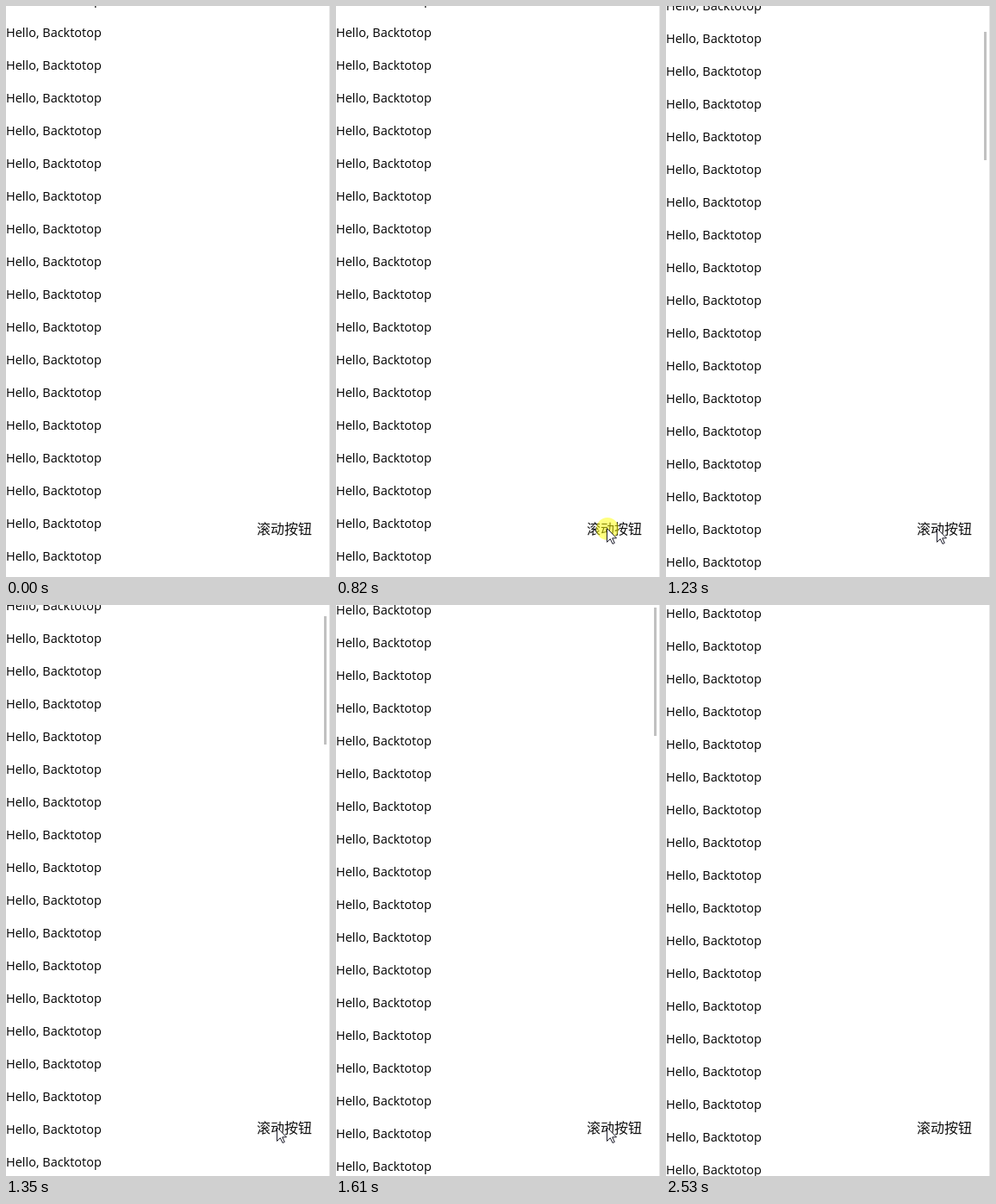
These frames come from a looping animation (376 px wide and 663 px high, 3280 ms). An HTML page:

```html
<!DOCTYPE html>
<html lang="zh">
<head>
<meta charset="utf-8">
<title>Back to top</title>
<style>
  html, body { margin: 0; width: 100%; height: 100%; overflow: hidden; background: #fff; }
  svg { display: block; }
  .row { font: 14.5px "Open Sans", "Noto Sans", sans-serif; }
  .button { font: 350 16px "Noto Sans CJK SC", "Noto Sans CJK", sans-serif; fill: #111; }
</style>
</head>
<body>
<svg width="376" height="663" viewBox="0 0 376 663">
  <g id="list"></g>
  <rect x="375" width="1" height="663" fill="#e4e4e4"/>
  <text class="button" x="291" y="613">滚动按钮</text>
  <rect id="thumb" x="369" width="3" height="149" fill="#c1c1c1"/>
  <circle id="press" cx="315" cy="607" r="13" fill="#ff0" fill-opacity=".5"/>
  <path id="cursor" d="M.5 .5V16.5L4.3 12.8L7 18.5L9.3 17.5L6.7 11.9H11.5Z" fill="#fff" stroke="#1c1c2b"/>
</svg>
<script>
const LOOP = 3280, ROW = 38, BOTTOM = 2259;
const $ = id => document.getElementById(id);
const list = $('list'), thumb = $('thumb'), press = $('press'), cursor = $('cursor');

for (let i = 0; i < 19; i++) {
  const row = document.createElementNS('http://www.w3.org/2000/svg', 'text');
  row.setAttribute('class', 'row');
  row.setAttribute('y', 15 + i * ROW);
  row.textContent = 'Hello, Backtotop';
  list.append(row);
}

// [time, scroll offset, steps since the previous point]: exponential decay in held steps
const decay = [[920, BOTTOM, 0], [1070, 592, 4], [1230, 124, 5], [1480, 13, 7], [1610, 4, 4], [1740, 1, 4]];
// [time, x, y] of the pointer tip
const exitPath = [[2130, 314, 606], [2430, 311, 616], [2480, 304, 638]];

const show = (el, on) => el.setAttribute('visibility', on ? 'visible' : 'hidden');
const move = (el, x, y) => el.setAttribute('transform', `translate(${x} ${y})`);
const hold = (u, steps) => Math.floor(u * steps) / steps;

function scrollAt(t) {
  if (t < 920) return BOTTOM;
  if (t >= 1740) return 0;
  const i = decay.findIndex(p => p[0] > t);
  const [t0, a] = decay[i - 1], [t1, b, steps] = decay[i];
  return Math.round(a * (b / a) ** hold((t - t0) / (t1 - t0), steps));
}

function cursorAt(t) {
  if (t < 80 || t >= 2530) return null;
  if (t < 560) {
    const left = (1 - hold((t - 80) / 480, 13)) ** 2;
    return [Math.round(314 - 5 * left), Math.round(608 + 52 * left)];
  }
  if (t < 620) return [314, 608];
  if (t < 650) return [314, 607];
  if (t < 2130) return [314, 606];
  return exitPath.filter(p => p[0] <= t).pop().slice(1);
}

function draw(t) {
  const scroll = scrollAt(t);
  move(list, 0, -(scroll % ROW));

  show(thumb, t >= 920 && t < 2280);
  thumb.setAttribute('y', 3 + Math.floor(scroll / 4.47));
  thumb.setAttribute('opacity', t < 2130 ? 1 : 0.75 - 0.75 * hold((t - 2130) / 150, 3));

  show(press, t >= 820 && t < 920);

  const tip = cursorAt(t);
  show(cursor, tip);
  if (tip) move(cursor, ...tip);
}

const start = performance.now();
function tick() {
  draw((performance.now() - start) % LOOP);
  requestAnimationFrame(tick);
}
tick();
</script>
</body>
</html>
```
